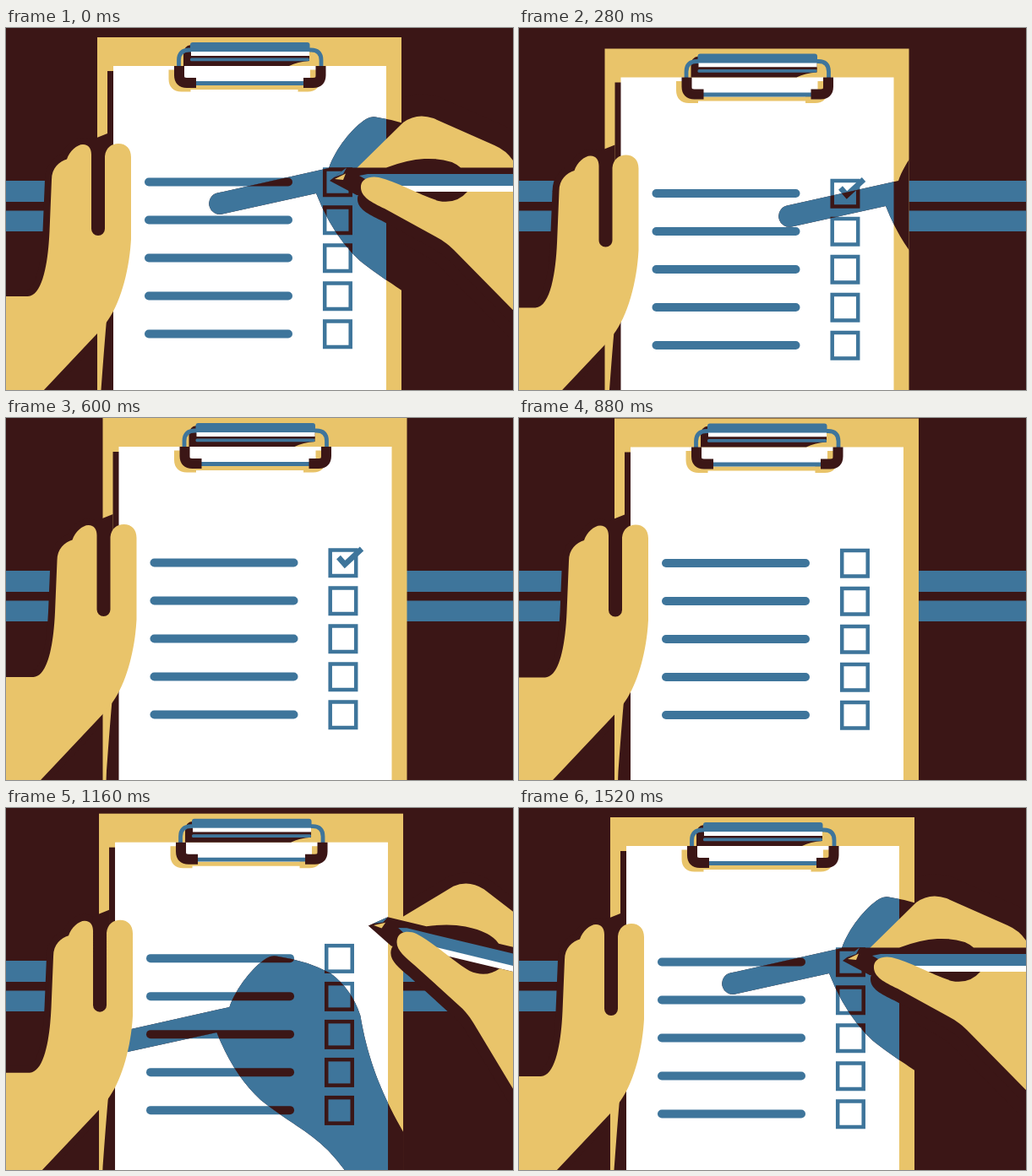
Recreate the animation shown at these times as an HTML page. Size 600 px wide and 429 px high, loop 1560 ms.

```html
<!DOCTYPE html>
<html lang="en">
<head>
<meta charset="utf-8">
<title>Checklist</title>
<style>
html, body { margin: 0; width: 100%; height: 100%; overflow: hidden; background: #3b1616; }
svg { display: block; width: 100vw; height: 100vh; }
.dark { fill: #3b1616; }
.gold { fill: #e9c46a; }
.blue { fill: #3e759b; }
.white { fill: #fff; }
.line { fill: none; stroke: currentColor; }
.ink { color: #3e759b; }
.shade { color: #3b1616; }
.glow { color: #e9c46a; }
</style>
</head>
<body>
<svg viewBox="0 0 600 429" preserveAspectRatio="none">
  <defs>
    <clipPath id="cast">
      <path id="castShape" d="M250 195.6 L382 166 C390 143 410 118 426 108 Q432 104 440 106 Q474 111 502 126 Q527 145 537 176 C545 225 560 262 580 300 L680 480 H600 Q570 430 539 391 Q520 358 499 336 C475 312 450 301 419 276 Q387 247 367 196 L256 220.4 A12.6 12.6 0 0 1 250 195.6Z"/>
    </clipPath>
    <g id="marks" class="line">
      <g id="rows"></g>
      <path id="tick" d="M387 176 L394.5 184.5 L414.5 166" stroke-width="6.5" pathLength="100" stroke-dasharray="100 200"/>
    </g>
    <g id="corners" class="line" stroke-width="12">
      <path d="M205 45 V56 Q205 65 214 65 H225"/>
      <path d="M372.5 45 V56 Q372.5 65 363.5 65 H352"/>
    </g>
    <path id="palm" d="M-20 318 H26 C44 317 50 275 51.5 241 L54 180 C54 166 63 158 72 155.500 C75 146 84 138 91 138 C98 138 101 143 101 150 V238 A8 8 0 0 0 117 238 V152 C118 142 125 137 133 137 C142 137 148 143 148 153 V250 C146 288 135 328 118 350 L108 362 L-5 482 H-20Z"/>
    <path id="thumb" d="M420 187 C421 179 430 175 441 177 C462 182 490 198 512 205 Q533 209 546 194 H760 V497 L530 263 Q520 253 508 247 L448 214 C432 206 419 200 420 187Z"/>
    <path id="back" d="M409 172 L470 112 Q486 100 506 107 L578 139 Q592 145 600 157 L760 250 V172Z"/>
  </defs>

  <rect class="dark" x="-5" y="-5" width="610" height="439"/>
  <path class="blue" d="M0 181 H600 V206 H0Z M0 216.500 H600 V241 H0Z"/>
  <g id="veil" class="dark" stroke="#3b1616" stroke-linejoin="round">
    <use href="#thumb"/><use href="#back"/>
  </g>

  <g id="board">
    <use href="#palm" class="dark" stroke="#3b1616" stroke-width="16"/>
    <rect class="gold" x="108" y="11" width="360" height="480"/>
    <rect class="dark" x="120" y="51" width="8" height="420"/>
    <path class="dark" d="M100 133 L120 125 V255 H100Z M119.500 340 Q116 380 112.500 429 L111 470 H127 V340Z"/>
    <rect class="white" x="127" y="45" width="323" height="440"/>
    <use href="#marks" class="ink"/>
    <g clip-path="url(#cast)">
      <rect class="dark" x="108" y="11" width="360" height="480"/>
      <rect class="blue" x="127" y="45" width="323" height="440"/>
      <use href="#marks" class="shade"/>
    </g>

    <path class="dark" d="M219 20 Q210 21 210 31 V45 H335 Q345 40 359 39 V20Z"/>
    <g class="glow" transform="translate(-6.5 4.500)">
      <use href="#corners"/>
      <path class="line" d="M218 66 H360" stroke-width="5"/>
    </g>
    <path class="line ink" d="M204.500 46 V38 Q204.500 26 217 26 H220 M373 46 V38 Q373 26 361 26 H358 M222 65.500 H355" stroke-width="4.800"/>
    <use href="#corners" class="shade"/>
    <rect class="blue" x="218" y="17" width="141.500" height="12" rx="3"/>
    <rect class="white" x="219" y="28" width="140" height="5"/>
    <rect class="dark" x="219" y="33" width="140" height="2.500"/>
    <rect class="blue" x="218" y="35.500" width="141" height="3.800" rx="1.500"/>
    <use href="#palm" class="gold"/>
  </g>

  <g id="hand">
    <use href="#thumb" class="dark" transform="translate(-4 14)"/>
    <use href="#back" class="gold"/>
    <path class="dark" d="M383 181 L403 165.500 H450 Q475 156 495 155 Q526 154 538 165.500 H760 V194 H546 Q535 207 520 206 L470 198 H415Z"/>
    <path class="blue" d="M388 177 L403 165.500 L399 173Z M418 175 L428 173 H760 V187.500 H440Z"/>
    <path class="gold" d="M389 179 L402 172.500 L399 180Z"/>
    <path class="white" d="M440 187 H760 V194 H440Z"/>
    <use href="#thumb" class="gold"/>
  </g>
</svg>
<script>
const LOOP = 1560, STEP = 40, TIP = [384, 181];
const $ = id => document.getElementById(id);

$("rows").innerHTML = [0, 1, 2, 3, 4].map(i => {
  const y = 182.5 + 45 * i;
  return `<path d="M169 ${y}H334" stroke-width="10" stroke-linecap="round"/>
    <rect x="377.2" y="${y - 15}" width="30.5" height="30.5" stroke-width="4.5"/>`;
}).join("");

// Each key: time, then the values to blend
const boardKeys = [[0, 0, 0], [280, -6.5, 13.5], [600, 6.5, -11], [880, 5, -10.5],
  [1040, 3, -7], [1320, 1, -1.5], [1520, 0, 0]];
const castOut = [[0, 0, 0], [120, 16, 4], [280, 67, 15], [440, 155, 24], [600, 275, 30]];
const castIn = [[760, -245, 620], [880, -207, 350], [1040, -154, 129], [1320, -69, 24], [1520, 0, 0]];
const handOut = [[0, 384, 181, 0], [40, 385, 181, 0], [80, 393, 190, 0], [160, 416, 175, 0],
  [200, 475, 165, 2], [280, 640, 145, 6]];
const handIn = [[800, 700, 230, 27], [880, 632, 200, 24], [1040, 480, 155, 18],
  [1320, 393, 130, 7.5], [1520, 384, 181, 0]];

// Smooth curve through the keys, without overshoot
function sample(keys, t) {
  const last = keys.length - 1;
  if (t <= keys[0][0]) return keys[0].slice(1);
  if (t >= keys[last][0]) return keys[last].slice(1);
  let i = 0;
  while (keys[i + 1][0] <= t) i++;
  const a = keys[i], b = keys[i + 1], span = b[0] - a[0], u = (t - a[0]) / span;
  const slope = (k, c) => (keys[k + 1][c] - keys[k][c]) / (keys[k + 1][0] - keys[k][0]);
  const tangent = (k, c) => {
    if (k === 0) return slope(0, c);
    if (k === last) return slope(last - 1, c);
    const p = slope(k - 1, c), q = slope(k, c);
    return p * q <= 0 ? 0 : 2 * p * q / (p + q);
  };
  return a.slice(1).map((v, n) => {
    const c = n + 1, w = 1 - u;
    return v * w * w * (1 + 2 * u) + b[c] * u * u * (3 - 2 * u)
      + span * (tangent(i, c) * u * w * w - tangent(i + 1, c) * u * u * w);
  });
}

const move = (id, value) => $(id).setAttribute("transform", value);
const clamp = v => Math.max(0, Math.min(1, v));

function draw(t) {
  const [bx, by] = sample(boardKeys, t);
  const [sx, sy] = sample(t < 680 ? castOut : castIn, t);
  const [hx, hy, turn] = sample(t < 680 ? handOut : handIn, t);
  move("board", `translate(${bx} ${by})`);
  move("castShape", `translate(${sx - bx} ${sy - by})`);
  const pose = `translate(${hx} ${hy}) rotate(${turn}) translate(${-TIP[0]} ${-TIP[1]})`;
  move("hand", pose);
  move("veil", pose);
  $("veil").setAttribute("stroke-width", 26 + 26 * clamp(1 - turn / 7));

  const drawn = clamp((t - 40) / 120);
  const tick = $("tick");
  tick.setAttribute("stroke-dashoffset", 100 - 100 * drawn);
  tick.setAttribute("visibility", drawn > 0 && t < 740 ? "visible" : "hidden");
}

const start = performance.now();
function frame() {
  const t = (performance.now() - start) % LOOP;
  draw(Math.floor(t / STEP) * STEP);
  requestAnimationFrame(frame);
}
draw(0);
requestAnimationFrame(frame);
</script>
</body>
</html>
```
